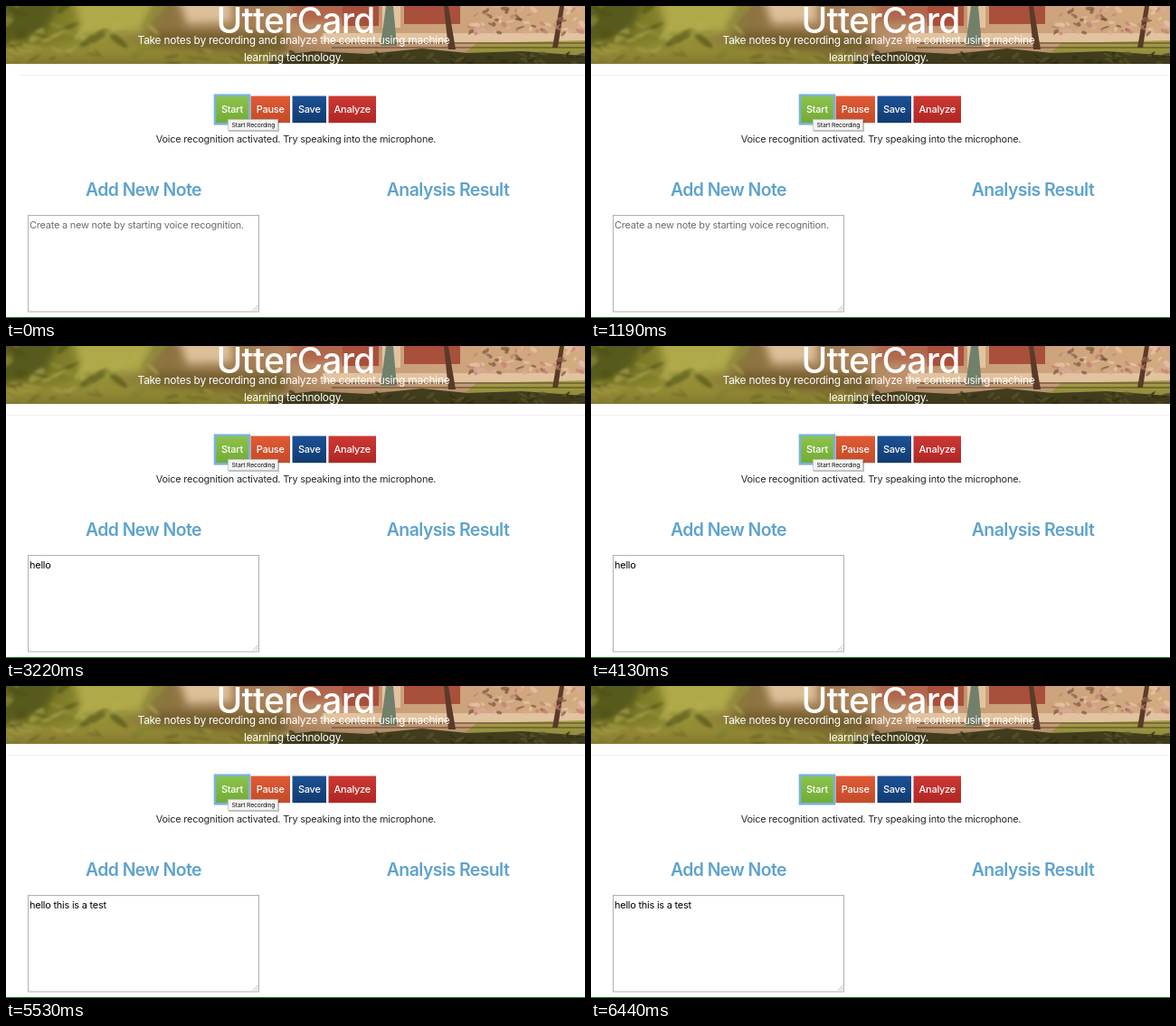
Write an HTML page that moves like this. It is 640 by 345 pixels and loops after 6.51 s.

```html
<!DOCTYPE html>
<html lang="en">
<head>
<meta charset="utf-8">
<title>Voice notes</title>
<style>
  html, body { margin: 0; width: 100%; height: 100%; overflow: hidden; background: #fff; }
  svg { display: block; width: 100vw; height: 100vh; }
  text { font: 400 10.95px Inter, "Open Sans", sans-serif; letter-spacing: -.02em; fill: #24292e; }
  .mid { text-anchor: middle; }
  .title { font-size: 39px; font-weight: 450; fill: #fff; }
  .tagline { font-size: 11.93px; fill: #fff; }
  .heading { font-size: 19.4px; font-weight: 600; letter-spacing: -.028em; fill: #5fa3cd; }
  .label { font-weight: 500; fill: #fff; }
  .tip { font-size: 6.8px; fill: #111; }
</style>
</head>
<body>
<svg id="stage" viewBox="0 0 640 345">
  <defs>
    <linearGradient id="scene">
      <stop offset="0" stop-color="#6a681f"/>
      <stop offset=".16" stop-color="#8d8a30"/>
      <stop offset=".28" stop-color="#8c7440"/>
      <stop offset=".4" stop-color="#a17a50"/>
      <stop offset=".6" stop-color="#c79c78"/>
      <stop offset="1" stop-color="#d3ab80"/>
    </linearGradient>
    <linearGradient id="shade" x2="0" y2="1">
      <stop offset=".6" stop-color="#2e2a10" stop-opacity="0"/>
      <stop offset="1" stop-color="#2e2a10" stop-opacity=".3"/>
    </linearGradient>
    <linearGradient id="green" x2="0" y2="1"><stop stop-color="#8cc34c"/><stop offset="1" stop-color="#73ab35"/></linearGradient>
    <linearGradient id="orange" x2="0" y2="1"><stop stop-color="#df5a34"/><stop offset="1" stop-color="#c54b2a"/></linearGradient>
    <linearGradient id="blue" x2="0" y2="1"><stop stop-color="#1b5195"/><stop offset="1" stop-color="#123b72"/></linearGradient>
    <linearGradient id="red" x2="0" y2="1"><stop stop-color="#cd3833"/><stop offset="1" stop-color="#b02725"/></linearGradient>
    <filter id="soft" x="-20%" y="-50%" width="140%" height="200%"><feGaussianBlur stdDeviation="5"/></filter>
    <filter id="leafy"><feGaussianBlur stdDeviation="1.8"/></filter>
    <filter id="fine"><feGaussianBlur stdDeviation=".6"/></filter>
    <clipPath id="banner"><path d="M0 0H640V64H0Z"/></clipPath>
  </defs>
  <path fill="#fff" d="M0 0H640V345H0Z"/>

  <g clip-path="url(#banner)">
    <path fill="url(#scene)" d="M0 0H640V64H0Z"/>
    <g filter="url(#soft)">
      <path fill="#565a1b" d="M-10 -10H62L40 32L-10 40Z"/>
      <path fill="#b0a94a" d="M75 -8H165L150 28L85 36Z"/>
      <path fill="#dcc09a" d="M190 -10H250V18L200 20Z"/>
      <path fill="#74602f" d="M165 28L310 30V50L150 48Z"/>
      <path fill="#a49a3a" d="M-10 46L110 42L300 54V74H-10Z"/>
      <path fill="#b0664c" d="M315 -8H410V18H315Z"/>
    </g>
    <g filter="url(#fine)">
      <path fill="#a8503c" d="M372 0H412V22H372ZM440 0H502V20H440Z"/>
      <path fill="#e2c3a0" d="M416 0H436V24H416ZM350 30H640V40H350Z"/>
      <path fill="#a5a046" d="M520 41L640 38V54H505Z"/>
      <path fill="#71806a" d="M420 0H428L432 44H414Z"/>
      <path fill="#45401f" d="M290 56L340 50L400 53L460 47L510 52L570 50L640 55V64H290Z"/>
      <path fill="none" stroke="#5a3f2b" d="M360 41H640M360 46H640"/>
      <path fill="#5a3b29" d="M484 0H489L497 48H489ZM612 0H617L610 46H604Z"/>
    </g>
    <g id="leaves" filter="url(#leafy)"></g>
    <g id="blossoms" filter="url(#fine)"></g>
    <path fill="url(#shade)" d="M0 0H640V64H0Z"/>
  </g>

  <text class="mid title" x="320" y="30">UtterCard</text>
  <text class="mid tagline" x="318" y="41.7">Take notes by recording and analyze the content using machine</text>
  <text class="mid tagline" x="318" y="60.7">learning technology.</text>
  <path id="rule" stroke="#f0f0f0"/>

  <g id="buttons"></g>
  <rect x="231" y="98.7" width="38" height="31.6" fill="none" stroke="#78b3da" stroke-width="2.6"/>
  <text class="mid" x="320.5" y="150.6">Voice recognition activated. Try speaking into the microphone.</text>

  <g id="tooltip">
    <rect x="246" y="127" width="56" height="12" fill="#000" opacity=".25" filter="url(#fine)"/>
    <rect x="245.5" y="125.5" width="55" height="12" fill="#f3f3f3" stroke="#bdbdbd" stroke-width=".7"/>
    <text class="mid tip" x="273.5" y="133.8">Start Recording</text>
  </g>

  <text class="mid heading" x="152" y="209.5">Add New Note</text>
  <text class="mid heading" x="488.5" y="209.5">Analysis Result</text>

  <rect x="24.5" y="231.5" width="255" height="106.5" fill="#fff" stroke="#b0b0b0"/>
  <path d="M273 336.5L278.5 331M276 336.5L278.5 334" stroke="#999" stroke-width=".7"/>
  <text id="note" x="26" y="245.5"></text>
  <path fill="#14781c" d="M0 344H640V345H0Z"/>
</svg>
<script>
  const LOOP = 6510;
  const TOOLTIP_END = 6160;
  const NOTES = [
    { from: 0, text: "Create a new note by starting voice recognition.", color: "#6c6c6c" },
    { from: 1820, text: "hello", color: "#000" },
    { from: 5180, text: "hello this is a test", color: "#000" }
  ];
  const BUTTONS = [
    ["Start", 232, 36, "green"],
    ["Pause", 270.5, 43.5, "orange"],
    ["Save", 316.5, 37.5, "blue"],
    ["Analyze", 356.5, 52.5, "red"]
  ];
  const byId = id => document.getElementById(id);

  function add(parent, tag, attrs, text = "") {
    const node = document.createElementNS("http://www.w3.org/2000/svg", tag);
    for (const key in attrs) node.setAttribute(key, attrs[key]);
    node.textContent = text;
    return parent.appendChild(node);
  }

  let seed = 17;
  const random = () => (seed = seed * 16807 % 2147483647) / 2147483647;

  function scatter(layer, count, [x, y, width, height], [rx, ry], colors) {
    for (let i = 0; i < count; i++) {
      const cx = x + random() * width, cy = y + random() * height;
      add(byId(layer), "ellipse", {
        cx, cy,
        rx: rx * (.5 + random()), ry: ry * (.5 + random()),
        fill: colors[i % colors.length],
        opacity: .6,
        transform: `rotate(${random() * 100 - 50} ${cx} ${cy})`
      });
    }
  }

  scatter("leaves", 26, [0, 0, 170, 46], [14, 3.5], ["#8f9038", "#4c4f18", "#b3ab4e"]);
  scatter("leaves", 30, [0, 48, 310, 16], [8, 1.5], ["#bdb052", "#716a27"]);
  scatter("blossoms", 50, [310, 51, 330, 13], [4, 1.5], ["#66602f", "#2f2b12"]);
  scatter("blossoms", 70, [510, 0, 130, 32], [3.5, 1.8], ["#e0aaa0", "#6b4a35", "#c27a70", "#ecccae"]);

  for (const [label, x, width, color] of BUTTONS) {
    add(byId("buttons"), "rect", { x, y: 99.5, width, height: 29.7, fill: `url(#${color})` });
    add(byId("buttons"), "text", { class: "mid label", x: x + width / 2, y: 118.3 }, label);
  }

  function render(time) {
    const note = NOTES.filter(({ from }) => time >= from).pop();
    byId("note").textContent = note.text;
    byId("note").style.fill = note.color;
    byId("tooltip").style.display = time < TOOLTIP_END ? "" : "none";
    byId("rule").setAttribute("d", `M${time < 700 ? 15 : 0} 76.5H640`);
  }

  const start = performance.now();
  function tick() {
    render((performance.now() - start) % LOOP);
    requestAnimationFrame(tick);
  }
  tick();
</script>
</body>
</html>
```
